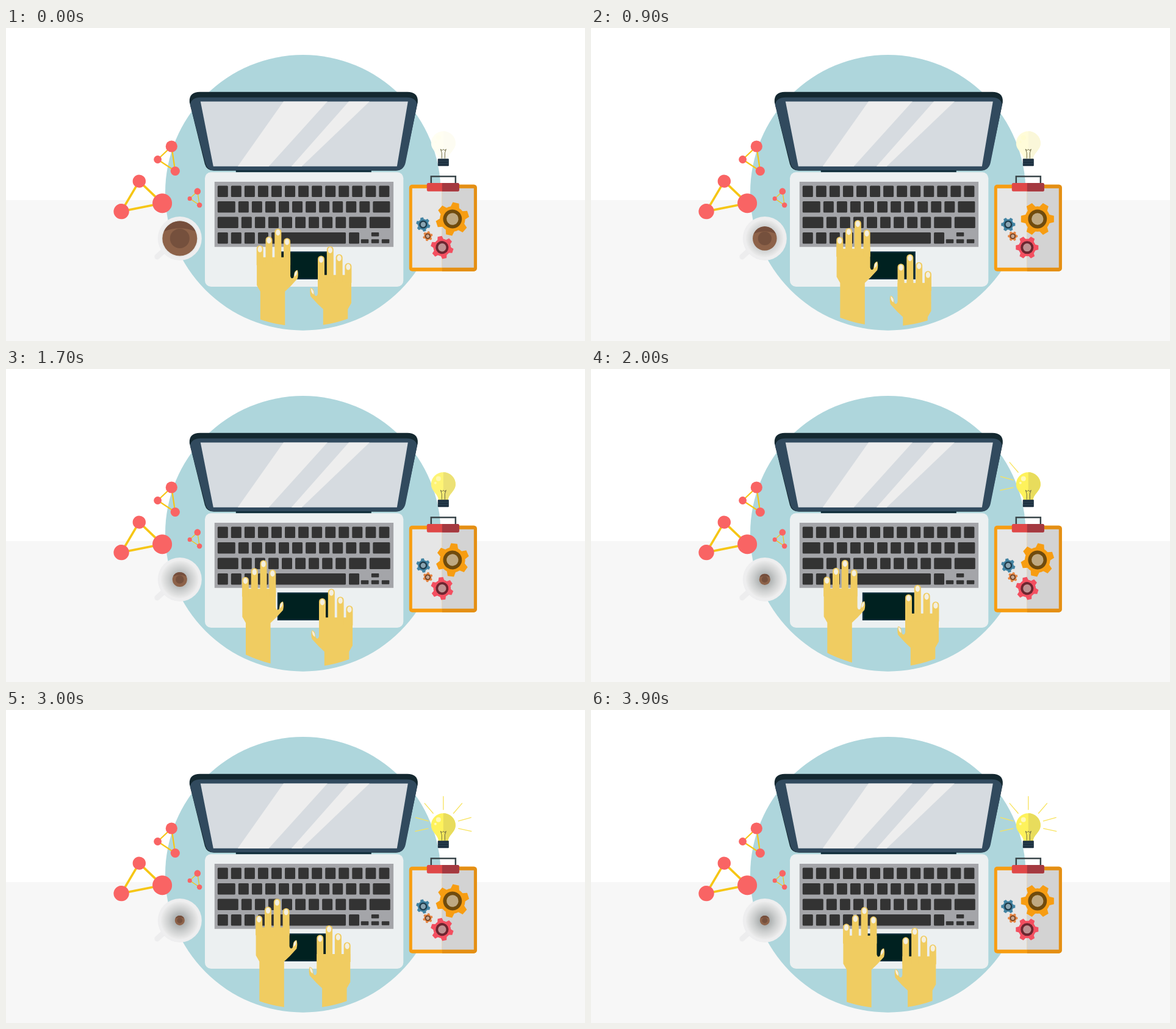
Write an HTML page with a canvas that moves like this. It is 949 px wide and 513 px high and loops after 4 s.

```html
<!DOCTYPE html>
<html lang="en">
<head>
<meta charset="utf-8">
<title>Desk at work</title>
<style>
  html, body { margin: 0; width: 100%; height: 100%; overflow: hidden; background: #fff; }
  canvas { display: block; }
</style>
</head>
<body>
<canvas id="stage" width="949" height="513"></canvas>
<script>
const ctx = document.getElementById('stage').getContext('2d');
const LOOP = 4000, STEP = 100, TAU = Math.PI * 2;
const clamp01 = v => Math.min(1, Math.max(0, v));

// Key points of the middle fingertip: time, x, y
const LEFT_HAND = [[0, 446, 329], [900, 437.5, 315], [2000, 416.5, 313], [2600, 429, 325], [3400, 460, 294]];
const RIGHT_HAND = [[0, 531.5, 358], [900, 523, 371], [1400, 531.5, 367], [2000, 535.5, 354], [3400, 527.5, 353]];

function along(keys, t) {
  const next = keys.findIndex(key => key[0] > t);
  const [t0, x0, y0] = keys.at(next < 0 ? -1 : next - 1);
  const [t1, x1, y1] = next < 0 ? [LOOP, keys[0][1], keys[0][2]] : keys[next];
  const k = (t - t0) / (t1 - t0);
  return [x0 + (x1 - x0) * k, y0 + (y1 - y0) * k];
}

function at(x, y, paint) {
  ctx.save();
  ctx.translate(x, y);
  paint();
  ctx.restore();
}

function circle(x, y, r, color) {
  ctx.fillStyle = color;
  ctx.beginPath();
  ctx.arc(x, y, r, 0, TAU);
  ctx.fill();
}

function box(x, y, w, h, color, r = 0) {
  ctx.fillStyle = color;
  ctx.beginPath();
  ctx.roundRect(x, y, w, h, r);
  ctx.fill();
}

function shape(d, color) {
  ctx.fillStyle = color;
  ctx.fill(new Path2D(d));
}

function stroke(d, color, width) {
  ctx.strokeStyle = color;
  ctx.lineWidth = width;
  ctx.stroke(new Path2D(d));
}

// The same three-node graph, anchored at its largest node
function network(x, y, scale, angle) {
  at(x, y, () => {
    ctx.rotate(angle);
    ctx.scale(scale, scale);
    stroke('M0 0L-22.700 21.500L6 40.500Z', '#f6c615', 2.2);
    circle(0, 0, 9.6, '#f96464');
    circle(-22.7, 21.5, 6.4, '#f96464');
    circle(6, 40.5, 7.6, '#f96464');
  });
}

function laptop() {
  shape('M301 122C300 110 307 105 318 105H658C669 105 676 110 675 122L654 222Q651 234 639 234H341Q329 234 326 223Z', '#142830');
  shape('M302 126Q304 114 319 114H657Q672 114 674 126L655 221Q652 233.500 640 233.500H341Q330 233.500 327 222Z', '#314a5e');
  shape('M319 120.700H659L641 227H340Z', '#d6dbe0');
  shape('M455 120.700H527L431 227H380Z', '#eee');
  shape('M562 120.700H596L485 227H468Z', '#eee');
  box(326.2, 236.5, 325.3, 187.7, '#ecf0f1', 10);
  box(377, 233.5, 222, 3, '#0d2b38');
  box(342, 252.3, 293.3, 106.7, '#a4a5a9');
  keyboard();
  box(445, 366.5, 87, 45.7, '#0c2e3c');
  box(447.5, 368.5, 82, 41.7, '#002120');
}

function keyboard() {
  const size = 17, gap = 5.05;
  const plain = n => Array(n).fill(size);
  const rows = [plain(13), [29, ...plain(10), 28], [34, ...plain(8), 28.5, 34], [...plain(4), 122, size]];
  rows.forEach((widths, row) => {
    let x = 347;
    for (const w of widths) {
      box(x, 258.7 + row * 25.5, w, 18.5, '#333', 1.5);
      x += w + gap;
    }
  });
  for (let i = 0; i < 3; i++) box(582 + i * 17, 346.5, 12.5, 6.5, '#333', 1);
  box(599, 335.2, 12.5, 6.5, '#333', 1);
}

function cup(t) {
  const level = Math.max(8, 28.5 - t * 0.0097) / 28.5;
  const inside = ctx.createRadialGradient(0, 0, 7, 0, 0, 31);
  inside.addColorStop(0, '#a9adad');
  inside.addColorStop(0.45, '#cbcdcd');
  inside.addColorStop(1, '#ececec');
  at(285, 345.2, () => {
    ctx.lineCap = 'round';
    stroke('M-25 19L-37 30', '#ededee', 9);
    circle(0, 0, 36, '#eeeeef');
    circle(0, 0, 31, inside);
    ctx.scale(level, level);
    circle(0, 0, 28.5, '#8d6249');
    shape('M-26 -11.500A28.500 28.500 0 0 1 26 -11.500Q0 -22 -26 -11.500Z', '#754e3c');
    circle(0, 0, 16, '#75503d');
  });
}

function bulb(t) {
  const glow = 0.08 + 0.92 * clamp01((t - 700) / 1200);
  const tint = (r, g, b) => `rgb(${[r, g, b].map(c => 255 + (c - 255) * glow)})`;
  const glass = 'M-8 26C-8 16 -20 12 -20 0A20 19.500 0 0 1 20 0C20 12 8 16 8 26Z';
  at(717, 189, () => {
    shape(glass, tint(254, 242, 92));
    ctx.save();
    ctx.clip(new Path2D(glass));
    box(0, -20, 22, 47, tint(232, 220, 92));
    ctx.globalAlpha = glow;
    circle(-8, -9, 4, '#fff9b8');
    circle(-13, -2, 2, '#fff9b8');
    ctx.restore();
    stroke('M-2.500 25V16L-4.500 10L-2 12L0 10L2 12L4.500 10L2.500 16V25', '#6b6642', 1);
    box(-9, 25.5, 18, 12, '#1d3040', 1);
    stroke('M-9 29.500H9M-9 33.500H9', '#34495a', 0.8);
    rays(t);
  });
}

// Rays light up one by one from left to right, packed closer toward the sides
function rays(t) {
  for (let i = 0; i < 7 && t >= 1800 + i * 100; i++) {
    const k = i - 3;
    ctx.save();
    ctx.rotate(k * (44 - 3.3 * Math.abs(k)) * TAU / 360);
    stroke('M0 -25V-47.500', '#f8e35c', 1.3);
    ctx.restore();
  }
}

function gear(x, y, r, angle, color, ring, core) {
  const teeth = 6, pitch = TAU / teeth;
  at(x, y, () => {
    ctx.rotate(angle);
    circle(0, 0, r * 0.77, color);
    for (let i = 0; i < teeth; i++) {
      ctx.rotate(pitch);
      at(0, 0, () => {
        ctx.scale(r, r);
        shape('M.7 -.27L1 -.19V.19L.7 .27Z', color);
      });
    }
    circle(0, 0, r * 0.57, ring);
    circle(0, 0, r * 0.36, core);
  });
}

function clipboard(t) {
  box(661, 257, 111, 142, '#f79d12', 5);
  box(715, 257, 57, 142, '#e48f14', [0, 5, 5, 0]);
  box(666, 263, 49, 130, '#e6e6e6');
  box(715, 263, 52, 130, '#d3d3d3');
  stroke('M697 256V243.500H737V256', '#3b474b', 2.5);
  box(690, 254.3, 53, 13.7, '#df4848', 2.5);
  box(715, 254.3, 28, 13.7, '#a43940', [0, 2.5, 2.5, 0]);
  const turn = (t - 900) / 2000 * TAU;
  gear(732, 313.3, 27, -turn, '#f79d12', '#704b0d', '#bfa982');
  gear(684, 322.3, 11.5, turn, '#4384a3', '#1f3c4c', '#8ba5b2');
  gear(691.5, 341.5, 8, -turn, '#e58440', '#693d20', '#c7a58f');
  gear(715, 360, 18.5, turn, '#f34f60', '#6d2630', '#bd9292');
}

// side is 1 for the left hand and -1 for its mirror image
function hand([x, y], side) {
  const skin = '#f0cc61', nail = '#f4efdf';
  at(x, y, () => {
    ctx.scale(side, 1);
    shape('M-34.700 47H20.300V78Q22 84 25.500 80L27 72Q29 68 32 68Q34 74 32 82L21 94L11.500 103V200H-29V103L-34.700 93Z', skin);
    shape('M27 79Q26 72 31.500 68.500Q32 76 27 79Z', nail);
    [27.5, 13, 0, 15.5].forEach((top, i) => {
      const center = (i - 2) * 14.8;
      box(center - 5.5, top, 11, 60 - top, skin, [5.5, 5.5, 0, 0]);
      ctx.fillStyle = nail;
      ctx.beginPath();
      ctx.ellipse(center, top + 6.5, 3.6, 5, 0, 0, TAU);
      ctx.fill();
    });
  });
}

function draw(t) {
  box(0, 0, 949, 513, '#fff');
  box(0, 282, 949, 231, '#f7f7f7');
  at(-0.2, -0.3, () => {
    circle(487, 270.2, 225.8, '#aed6dc');
    laptop();
    network(256.3, 287.5, 1.67, 1.52);
    network(271.5, 194.3, 1, 0);
    network(314, 268, 0.555, 0);
    cup(t);
    bulb(t);
    clipboard(t);
    // Both wrists end on a circle just inside the backdrop
    ctx.beginPath();
    ctx.arc(487, 270, 219.5, 0, TAU);
    ctx.clip();
    hand(along(LEFT_HAND, t), 1);
    hand(along(RIGHT_HAND, t), -1);
  });
}

const start = performance.now();
function tick(now) {
  const t = Math.max(0, now - start) % LOOP;
  draw(Math.floor(t / STEP) * STEP);
  requestAnimationFrame(tick);
}
draw(0);
requestAnimationFrame(tick);
</script>
</body>
</html>
```
